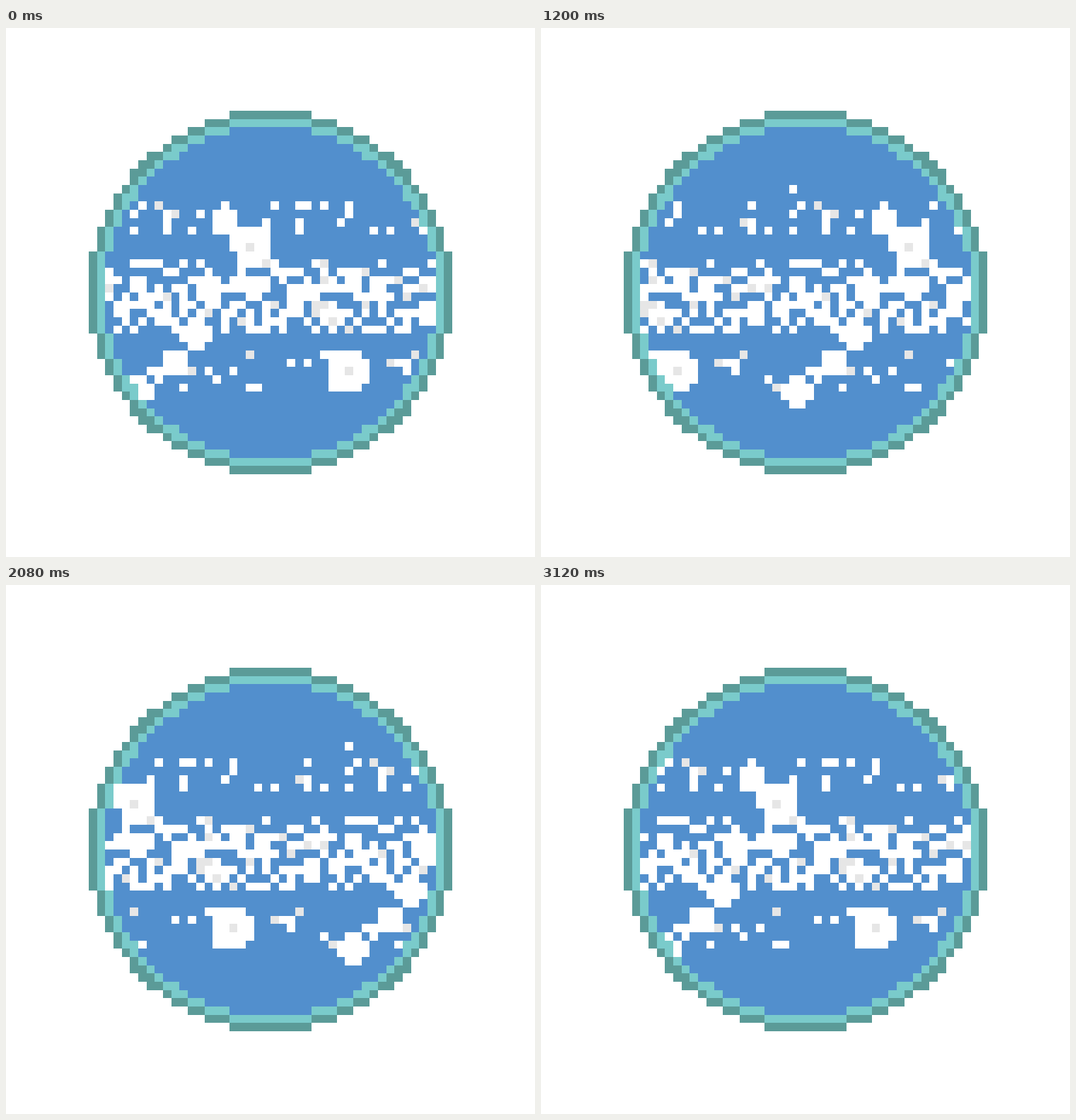
These frames come from a looping animation (748x748 px, 3200 ms). An HTML page with a canvas:

```html
<!DOCTYPE html>
<html>
<head>
<meta charset="utf-8">
<style>
  html, body { margin: 0; width: 100%; height: 100%; overflow: hidden; background: #fff; }
  canvas { display: block; }
</style>
</head>
<body>
<canvas width="748" height="748"></canvas>
<script>
const GRID = 64, CELL = 748 / GRID, SPAN = 40, LEFT = 12, STEP = 80;
const BLUE = '#528fcd', WHITE = '#fff', GREY = '#e6e6e6', LIGHT = '#7acbcb', DARK = '#5b9b98';
const ctx = document.querySelector('canvas').getContext('2d');

// The cloud map wraps around: one column per visible cell across the planet.
const map = Array.from({ length: GRID }, () => Array(SPAN).fill(BLUE));

let seed = 7;
function random() {
  seed = (seed * 1664525 + 1013904223) % 4294967296;
  return seed / 4294967296;
}

// Loose specks of cloud, a few of them in shade.
function scatter(top, bottom, density) {
  for (let y = top; y <= bottom; y++)
    for (let x = 0; x < SPAN; x++)
      if (random() < density(y)) map[y][x] = random() < 0.08 ? GREY : WHITE;
}

// A round bank of cloud; the large storms have a grey eye.
function bank(cx, cy, r) {
  for (let y = Math.ceil(cy - r); y <= cy + r; y++)
    for (let x = Math.ceil(cx - r); x <= cx + r; x++)
      if (Math.hypot(x - cx, y - cy) <= r) map[y][x] = WHITE;
  if (r > 2) map[Math.round(cy)][Math.round(cx)] = GREY;
}

scatter(21, 24, () => 0.2);
scatter(28, 36, y => 0.64 - 0.022 * (y - 32.3) ** 2);
scatter(39, 43, () => 0.16);

bank(17.4, 25.9, 2.6);
bank(28.9, 41, 2.8);

// A trail of smaller banks slants down from the northern storm.
bank(3, 19, 0.5);
bank(14, 22.2, 1.3);
bank(12.3, 30.7, 1.6);
bank(10.5, 36.3, 1.9);
bank(8, 40, 1.5);
bank(3.5, 43.4, 1.9);

function cellColor(x, y, shift) {
  const d = (x - 31.5) ** 2 + (y - 31.5) ** 2;
  if (d > 484) return WHITE;
  if (d > 441) return DARK;
  if (d > 402) return LIGHT;
  return map[y][(x - LEFT - shift + SPAN) % SPAN];
}

function draw(now) {
  const shift = Math.floor(now / STEP) % SPAN;
  const edge = i => Math.round(i * CELL);
  for (let y = 0; y < GRID; y++)
    for (let x = 0; x < GRID; x++) {
      ctx.fillStyle = cellColor(x, y, shift);
      ctx.fillRect(edge(x), edge(y), edge(x + 1) - edge(x), edge(y + 1) - edge(y));
    }
}

const start = performance.now();
function tick() {
  draw(performance.now() - start);
  requestAnimationFrame(tick);
}
tick();
</script>
</body>
</html>
```
